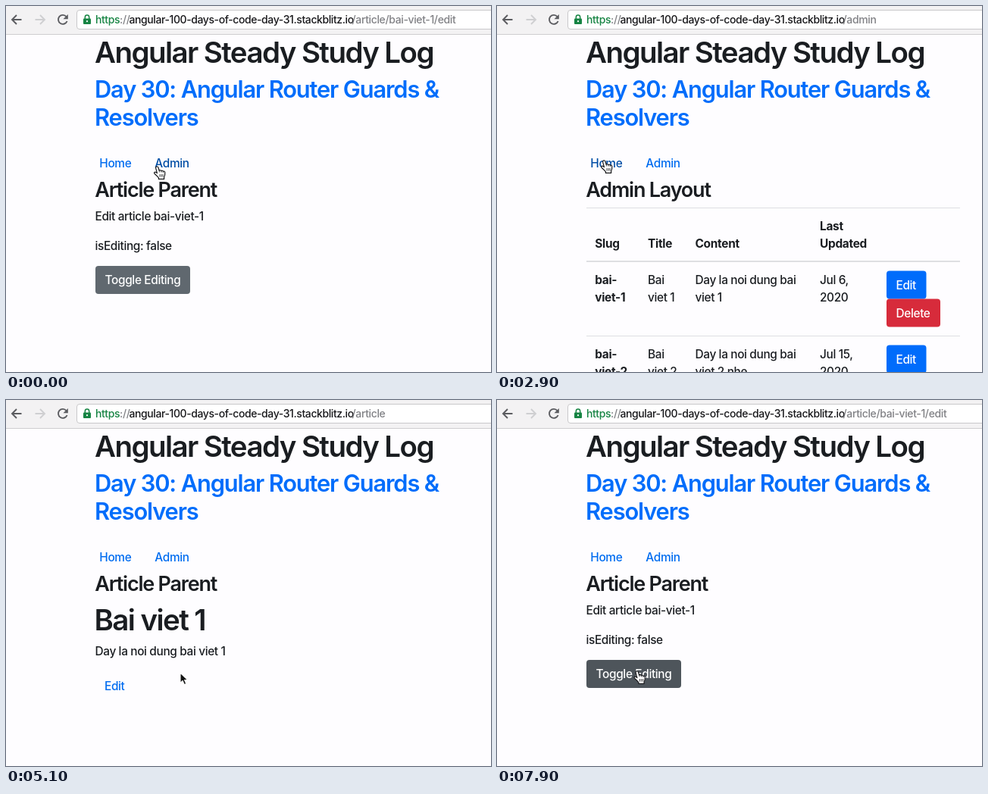
Animation, 640 px wide and 483 px high, one loop 8 s. Source, as an HTML page:

```html
<!DOCTYPE html>
<html lang="en">
<head>
<meta charset="utf-8">
<title>Router guards demo</title>
<style>
  html, body { margin: 0; width: 100%; height: 100%; overflow: hidden; background: #fefdff; }
  svg { display: block; width: 640px; height: 483px; }
  text { font: 450 15.4px Inter, "Open Sans", sans-serif; letter-spacing: -.36px; fill: #1a1d21; white-space: pre; }
  .h1 { font-size: 38.5px; font-weight: 560; letter-spacing: -.041em; }
  .h2 { font-size: 30.8px; font-weight: 560; letter-spacing: -.037em; fill: #006dfb; }
  .h3 { font-size: 27px; font-weight: 560; letter-spacing: -.045em; }
  .b { font-weight: 700; letter-spacing: -.28px; }
  .mid { text-anchor: middle; }
  .url { font-size: 14px; letter-spacing: -.41px; fill: #808185; }
  #path { letter-spacing: -.37px; }
  .link text { fill: #006cf0; }
  .link.on text { fill: #004da5; }
  .under.on text { text-decoration: underline; }
  .btn text { fill: #fff; }
  .blue rect { fill: #006cfb; }
  .blue.on rect { fill: #005fd6; }
  .red rect { fill: #d72b3b; }
  .gray rect { fill: #60686f; }
  .gray.on rect { fill: #4e555b; }
  .card rect { fill: none; stroke: #d5d5d8; }
  .card .head { fill: #f3f2f5; }
  .icon { fill: none; stroke: #5b5c60; stroke-width: 1.9; }
</style>
</head>
<body>
<svg viewBox="0 0 640 483">
  <rect width="640" height="483" fill="#fefdff"/>

  <!-- browser bar -->
  <rect width="640" height="37" fill="#f3f2f3"/>
  <path d="M0 37.5H640" stroke="#cfced0"/>
  <rect x="93.5" y="5.5" width="570" height="25" rx="3.5" fill="#fff" stroke="#c9c8ca"/>
  <path class="icon" d="M20.5 18H8.5M14 12L8 18L14 24"/>
  <path class="icon" style="stroke:#cfcfd1" d="M38.5 18H50.5M45 12L51 18L45 24"/>
  <path class="icon" d="M79.6 14A6 6 0 1 0 80.6 20"/>
  <path d="M81.8 11V17.3H75.5Z" fill="#5b5c60"/>
  <rect x="102" y="16.5" width="10" height="7.5" rx="1" fill="#168443"/>
  <path d="M104.3 17V14.8A2.7 2.7 0 0 1 109.7 14.8V17" fill="none" stroke="#168443" stroke-width="1.5"/>
  <circle cx="107" cy="20.2" r="1.1" fill="#fff"/>
  <text class="url" x="118" y="23.4" style="fill:#168443">https<tspan fill="#808185">://</tspan></text>
  <text class="url" x="162.5" y="23.4" style="fill:#17171a">angular-100-days-of-code-day-31.stackblitz.io</text>
  <text class="url" id="path" x="456.5" y="23.4"></text>

  <!-- shared header -->
  <text class="h1" x="117" y="75">Angular Steady Study Log</text>
  <text class="h2" x="117" y="121">Day 30: Angular Router Guards &amp;</text>
  <text class="h2" x="117" y="158">Resolvers</text>
  <g class="link" data-box="118 194 53 29"><text x="123.3" y="212.7">Home</text></g>
  <g class="link" data-box="191 194 56 29"><text x="196.3" y="212.7">Admin</text></g>
  <text class="h3" id="title" x="117.3" y="252.4"></text>

  <g data-page="edit">
    <text x="117.5" y="283.2">Edit article bai-viet-1</text>
    <text x="117.5" y="321.9">isEditing: false</text>
    <g class="btn gray" data-box="118 343 125 37">
      <rect x="118" y="343" width="125" height="37" rx="4"/>
      <text x="130.6" y="367.4">Toggle Editing</text>
    </g>
  </g>

  <g data-page="admin">
    <path d="M118 266.5H611M118 435.5H611" stroke="#dedfe2"/>
    <path d="M118 337H611" stroke="#dedfe2" stroke-width="2"/>
    <text class="b" x="129.2" y="318.5">Slug</text>
    <text class="b" x="199" y="318.5">Title</text>
    <text class="b" x="261.5" y="318.5">Content</text>
    <text class="b" x="426" y="295.5">Last</text>
    <text class="b" x="426" y="318.5">Updated</text>
    <g id="rows"></g>
    <g class="btn blue" data-box="514 350 52 36">
      <rect x="514" y="349.5" width="52.5" height="37" rx="4"/>
      <text x="526.5" y="373.7">Edit</text>
    </g>
    <g class="btn red">
      <rect x="514" y="386.5" width="71" height="37" rx="4"/>
      <text x="526.5" y="410.5">Delete</text>
    </g>
    <g class="btn blue" data-box="514 448 52 36">
      <rect x="514" y="447.5" width="52.5" height="37" rx="4"/>
      <text x="526.5" y="471.7">Edit</text>
    </g>
  </g>

  <g data-page="list">
    <g class="card">
      <path class="head" d="M118.5 313.5V270Q118.5 266.5 122 266.5H607Q610.5 266.5 610.5 270V313.5Z" stroke="#d5d5d8"/>
      <rect x="118.5" y="266.5" width="492" height="162" rx="4"/>
      <path class="head" d="M118.5 476.5V433Q118.5 429.5 122 429.5H607Q610.5 429.5 610.5 433V476.5Z" stroke="#d5d5d8"/>
      <rect x="118.5" y="429.5" width="492" height="162" rx="4"/>
    </g>
    <text class="mid" x="364.3" y="295.5">Bai viet 1</text>
    <text class="mid" x="364.3" y="350.5">Day la noi dung bai viet 1</text>
    <text class="mid" x="364.3" y="458.7">Bai viet 2</text>
    <g class="btn blue" data-box="304 372 121 37">
      <rect x="303.7" y="372" width="121.7" height="37" rx="4"/>
      <text class="mid" x="364.3" y="396">Xem Bai viet 1</text>
    </g>
  </g>

  <g data-page="view">
    <text class="h1" x="116.5" y="304">Bai viet 1</text>
    <text x="117.5" y="337">Day la noi dung bai viet 1</text>
    <g class="link under" data-box="118 359 52 37"><text x="130" y="382.5">Edit</text></g>
  </g>

  <g id="cursor" stroke-linejoin="round">
    <path id="arrow" d="M0 0V13.4L3.1 10.5L5.3 15.6L7.8 14.5L5.6 9.6H9.8Z" fill="#111" stroke="#fff" stroke-width="1.1"/>
    <g id="hand" transform="translate(-1 0)">
      <path d="M-1.4 1.8C-1.8-.5 1.2-1 1.9 1L3.2 5.2C4 4.4 5.4 4.6 5.8 5.6C6.8 4.8 8 5.2 8.4 6.2C9.6 5.6 10.7 6.5 10.8 8C11 10.8 10.6 12 9.6 14V16.4H2.4V14.8C1 13.2-.4 11.4-3 9.2C-4.2 7.9-2.6 6.5-1.1 7.4L.4 8.6Z" fill="#fff" stroke="#17171a" stroke-width="1.2"/>
      <path d="M3.2 5.2L3.6 7.4M5.8 5.6L6.1 7.6M8.4 6.2V8M4 10V13.6M6.1 10V13.6M8.1 10V13.6" fill="none" stroke="#17171a" stroke-width=".8"/>
    </g>
  </g>
</svg>
<script>
const LOOP = 8000, STEP = 100;
const $ = id => document.getElementById(id);

const pages = {
  edit: { path: "/article/bai-viet-1/edit", title: "Article Parent" },
  admin: { path: "/admin", title: "Admin Layout" },
  list: { path: "/article", title: "Article Parent" },
  view: { path: "/article", title: "Article Parent" }
};
const visits = [[0, "edit"], [1400, "admin"], [3200, "list"], [4500, "view"], [6000, "edit"]];

// time, x, y of the pointer tip
const route = [
  [0, 200, 212], [450, 204, 220], [1000, 211, 206], [1800, 211, 206],
  [2700, 142, 204], [3350, 142, 204], [4050, 325, 362], [4200, 332, 379],
  [4950, 332, 379], [5100, 230, 360], [5500, 145, 368], [6100, 145, 368],
  [6700, 183, 300], [7400, 185, 354], [7900, 185.5, 358]
];

const columns = [129.2, 199, 261.5, 426];
const rows = [
  ["bai-|viet-1", "Bai|viet 1", "Day la noi dung bai|viet 1", "Jul 6,|2020"],
  ["bai-|viet-2", "Bai|viet 2", "Day la noi dung bai|viet 2 nhe", "Jul 15,|2020"]
];
$("rows").innerHTML = rows.map((cells, r) => cells.map((cell, c) =>
  cell.split("|").map((line, i) =>
    `<text class="${c ? "" : "b"}" x="${columns[c]}" y="${367 + r * 98 + i * 23}">${line}</text>`
  ).join("")).join("")).join("");

const groups = [...document.querySelectorAll("[data-page]")];
const targets = [...document.querySelectorAll("[data-box]")].map(el => ({
  el,
  box: el.dataset.box.split(" ").map(Number),
  page: el.closest("[data-page]")?.dataset.page
}));

function pointer(t) {
  const i = route.findIndex(k => k[0] > t);
  if (i < 0) return route[route.length - 1].slice(1);
  if (i === 0) return route[0].slice(1);
  const [t0, x0, y0] = route[i - 1], [t1, x1, y1] = route[i];
  const u = (t - t0) / (t1 - t0), e = u * u * (3 - 2 * u);
  return [x0 + (x1 - x0) * e, y0 + (y1 - y0) * e];
}

const inside = ([px, py], [x, y, w, h]) => px >= x && px <= x + w && py >= y && py <= y + h;

function draw(t) {
  const name = visits.filter(v => v[0] <= t).pop()[1];
  const pos = pointer(t), before = pointer(Math.max(0, t - STEP));
  groups.forEach(g => g.style.display = g.dataset.page === name ? "" : "none");
  $("path").textContent = pages[name].path;
  $("title").textContent = pages[name].title;

  // hover colours trail the pointer by one step
  let over = false;
  for (const { el, box, page } of targets) {
    const live = !page || page === name;
    el.classList.toggle("on", live && inside(before, box));
    over = over || live && inside(pos, box);
  }
  $("hand").style.display = over ? "" : "none";
  $("arrow").style.display = over ? "none" : "";
  $("cursor").setAttribute("transform", `translate(${pos[0]} ${pos[1]})`);
}

const start = performance.now();
function tick() {
  const t = (performance.now() - start) % LOOP;
  draw(Math.floor(t / STEP) * STEP);
  requestAnimationFrame(tick);
}
tick();
</script>
</body>
</html>
```
